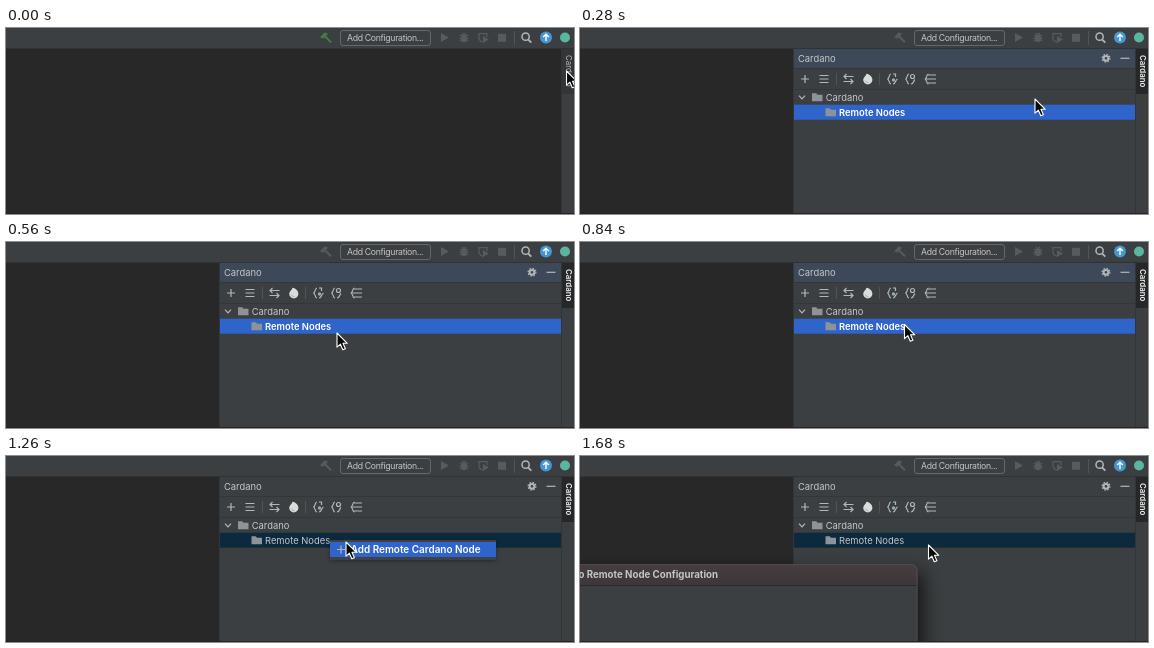
Animation, 568 px wide and 186 px high, one loop 1.78 s. Source, as an HTML page:

```html
<!DOCTYPE html>
<html lang="en">
<head>
<meta charset="utf-8">
<title>Tool window</title>
<style>
html, body { margin: 0; width: 100%; height: 100%; overflow: hidden; background: #282828; }
svg { display: block; width: 100%; height: 100%; }
text { font: 9.4px Inter, "Open Sans", sans-serif; fill: #c3c5c7; white-space: pre; }
.line { fill: none; stroke: #b4b7b9; stroke-width: 1.2; }
.dim { fill: #585b5d; stroke: none; }
.dimline { fill: none; stroke: #585b5d; stroke-width: 1.2; }
</style>
</head>
<body>
<svg viewBox="0 0 568 186" preserveAspectRatio="none">
  <defs>
    <path id="folder" d="M0 0H4.2L5.5 1.5H10.5V8H0Z" fill="#8d9499"/>
    <path id="brace" class="line" d="M4 -5C1.6 -5 2.8 -.5 .4 0C2.8 .5 1.6 5 4 5"/>
    <path id="plus" class="line" d="M-4 0H4M0 -4V4"/>
    <filter id="blur" x="-20%" y="-40%" width="140%" height="180%"><feGaussianBlur stdDeviation="9"/></filter>
    <filter id="soft" x="-10%" y="-50%" width="120%" height="200%"><feGaussianBlur stdDeviation="2"/></filter>
    <linearGradient id="bar" x2="0" y2="1"><stop stop-color="#463d40"/><stop offset="1" stop-color="#3d3638"/></linearGradient>
  </defs>

  <rect width="568" height="186" fill="#282828"/>
  <rect width="568" height="20" fill="#3c3f41"/>
  <rect y="20" width="568" height="1" fill="#303233"/>

  <!-- main toolbar -->
  <g id="hammer">
    <path d="M314 9.3L318.6 4.6L322 5.6L320.6 7.4L317 10.8Z" stroke="none"/>
    <path d="M319 8.2L325 14.4" stroke-width="2"/>
  </g>
  <rect x="334.5" y="2.5" width="90" height="15" rx="2.5" fill="#3c3f41" stroke="#65686a"/>
  <text x="341" y="13" style="font-size:8.7px;letter-spacing:-.31px">Add Configuration...</text>
  <path class="dim" d="M435 5L443 9.5L435 14Z"/>
  <ellipse class="dim" cx="458" cy="10.3" rx="3" ry="4"/>
  <path class="dimline" d="M454 7L462 13M454 13L462 7M453.5 10.3H462.5M456 5L458 7L460 5"/>
  <path class="dimline" d="M481 9V5.6H473V10C473 12 475 13.6 477 14.3"/>
  <path class="dim" d="M477 8L483 11.5L477 15Z"/>
  <rect class="dim" x="492" y="5.8" width="8" height="8"/>
  <path d="M508.5 3V17" stroke="#515456"/>
  <circle class="line" cx="519.6" cy="8.7" r="3.6" style="stroke-width:1.5"/>
  <path class="line" d="M522 11.3L525.3 14.6" style="stroke-width:1.8"/>
  <circle cx="540" cy="9.5" r="6" fill="#4496d6"/>
  <path d="M540 13V6.4M537.2 9L540 6.2L542.8 9" fill="none" stroke="#fff" stroke-width="1.4"/>
  <circle cx="559" cy="9.5" r="5" fill="#5bb5a0"/>

  <!-- right stripe -->
  <rect x="555" y="21" width="13" height="165" fill="#3c3f41"/>
  <rect id="tab" x="555" y="21" width="13" height="45"/>
  <path d="M555.5 21V186" stroke="#323435"/>
  <text id="tabText" transform="translate(560 27) rotate(90)" style="font-size:7.9px">Cardano</text>

  <!-- tool window -->
  <g id="panel">
    <rect x="213" y="21" width="342" height="165" fill="#3c3f41"/>
    <rect id="header" x="213" y="21" width="342" height="19"/>
    <path d="M213.5 21V186M213 40.5H555M213 61.5H555" stroke="#343739"/>
    <text x="218" y="34">Cardano</text>
    <circle class="line" cx="526" cy="30.3" r="2.4" style="stroke-width:2"/>
    <circle class="line" cx="526" cy="30.3" r="3.9" stroke-dasharray="1.6 1.46"/>
    <path class="line" d="M540.5 30.3H549.5"/>
    <use href="#plus" x="225" y="51"/>
    <path class="line" d="M239.5 47.5H248.5M239.5 51H248.5M239.5 54.5H248.5"/>
    <path d="M256.5 45V57" stroke="#515456"/>
    <path class="line" d="M273.5 48.5H264M266.5 46L264 48.5L266.5 51M263.5 53.5H273M270.5 51L273 53.5L270.5 56"/>
    <path d="M286.5 45.7C290 46.3 292.4 48.8 292.4 51.8A4.6 4.6 0 0 1 283.2 51.8C283.2 49.3 285.8 48.3 286.5 45.7Z" fill="#d9dedd"/>
    <path d="M285.5 52.5C286 54.3 287.5 54.8 288.5 54.8" stroke="#8eb39f" fill="none"/>
    <path d="M299.5 45V57" stroke="#515456"/>
    <use href="#brace" x="307" y="51"/>
    <path class="line" d="M313 46H315.5V49M313 56C316 56 315 52 317.5 51"/>
    <circle cx="313.5" cy="52" r="1.7" fill="#8eb39f"/>
    <use href="#brace" x="325" y="51"/>
    <circle class="line" cx="332.5" cy="48.5" r="2"/>
    <path class="line" d="M331 56C334 56 333 53 335 51.5"/>
    <use href="#brace" x="344.5" y="51"/>
    <path class="line" d="M348 47H356M346 51H356M348 55H356"/>
    <path class="line" d="M219 67.7L222 70.8L225 67.7"/>
    <use href="#folder" x="232" y="65.3"/>
    <text x="245.7" y="73">Cardano</text>
    <rect id="row" x="214" y="76.7" width="341" height="15"/>
    <use href="#folder" x="245.5" y="80.3"/>
    <text id="rowText" x="259" y="88">Remote Nodes</text>
  </g>

  <g id="menu">
    <rect x="324" y="86" width="166" height="19" fill="#000" opacity=".35" filter="url(#soft)"/>
    <rect x="324" y="84" width="166" height="20" fill="#3f4244"/>
    <rect id="item" x="324" y="86" width="166" height="15" fill="#2f65ca"/>
    <use href="#plus" x="335" y="93.5"/>
    <text id="itemText" x="344.7" y="97.3" style="font-size:9.95px">Add Remote Cardano Node</text>
  </g>

  <g id="dialog">
    <rect x="-40" y="116" width="384" height="120" rx="6" fill="#000" opacity=".65" filter="url(#blur)"/>
    <rect x="-20" y="108" width="357.5" height="90" rx="6" fill="#3c3f41"/>
    <path d="M-1 130V108H331.5A6 6 0 0 1 337.5 114V130Z" fill="url(#bar)"/>
    <path d="M0 129.5H337" stroke="#2a2a2b"/>
    <rect x="-20" y="108.5" width="357" height="90" rx="6" fill="none" stroke="#545152" stroke-width=".8"/>
    <text x="138" y="122" text-anchor="end" style="font-size:9.7px;font-weight:700">Cardano Remote Node Configuration</text>
  </g>

  <rect y="185" width="568" height="1" fill="#2a2025"/>
  <path id="cursor" d="M0 0V14.2L3.4 11.2L5.8 16.8L8.4 15.7L6 10.3H10.3Z" fill="#080808" stroke="#fff" stroke-width="1.1" stroke-linejoin="round"/>
</svg>
<script>
const LOOP = 1780;
const CLOSED = 0, OPEN = 1, MENU = 2, HOVER = 3, DIALOG = 4;
// start ms, pointer x, pointer y, stage of the interaction
const steps = [
  [0, 560.5, 43, CLOSED],
  [140, 560.5, 43, OPEN],
  [280, 455, 71, OPEN],
  [420, 341.5, 100.5, OPEN],
  [560, 331, 91, OPEN],
  [700, 324.5, 82.5, OPEN],
  [980, 327.5, 82.5, MENU],
  [1260, 340, 86, HOVER],
  [1400, 348.5, 89, HOVER],
  [1680, 348.5, 89, DIALOG]
];
const $ = id => document.getElementById(id);
const show = (id, on) => $(id).setAttribute("visibility", on ? "visible" : "hidden");
const fill = (id, color) => { $(id).style.fill = color; };
const label = (id, color, strong) => {
  fill(id, color);
  $(id).style.fontWeight = strong ? 600 : 400;
};

function draw(ms) {
  const [, x, y, stage] = steps.findLast(s => s[0] <= ms);
  const open = stage !== CLOSED;
  const focused = stage === OPEN;
  const hover = stage === HOVER;
  const hammer = open ? "#585b5d" : "#467a4b";
  show("panel", open);
  show("menu", stage === MENU || hover);
  show("item", hover);
  show("dialog", stage === DIALOG);
  fill("tab", open ? "#252728" : "#333638");
  label("tabText", open ? "#f0f0f0" : "#b5b7b9", open);
  fill("hammer", hammer);
  $("hammer").style.stroke = hammer;
  fill("header", focused ? "#3d4958" : "#3c3f41");
  fill("row", focused ? "#2f65ca" : "#0d293e");
  label("rowText", focused ? "#fff" : "#c3c5c7", focused);
  label("itemText", hover ? "#fff" : "#c3c5c7", hover);
  $("cursor").setAttribute("transform", `translate(${x} ${y})`);
}

const start = performance.now();
function tick() {
  draw((performance.now() - start) % LOOP);
  requestAnimationFrame(tick);
}
tick();
</script>
</body>
</html>
```
